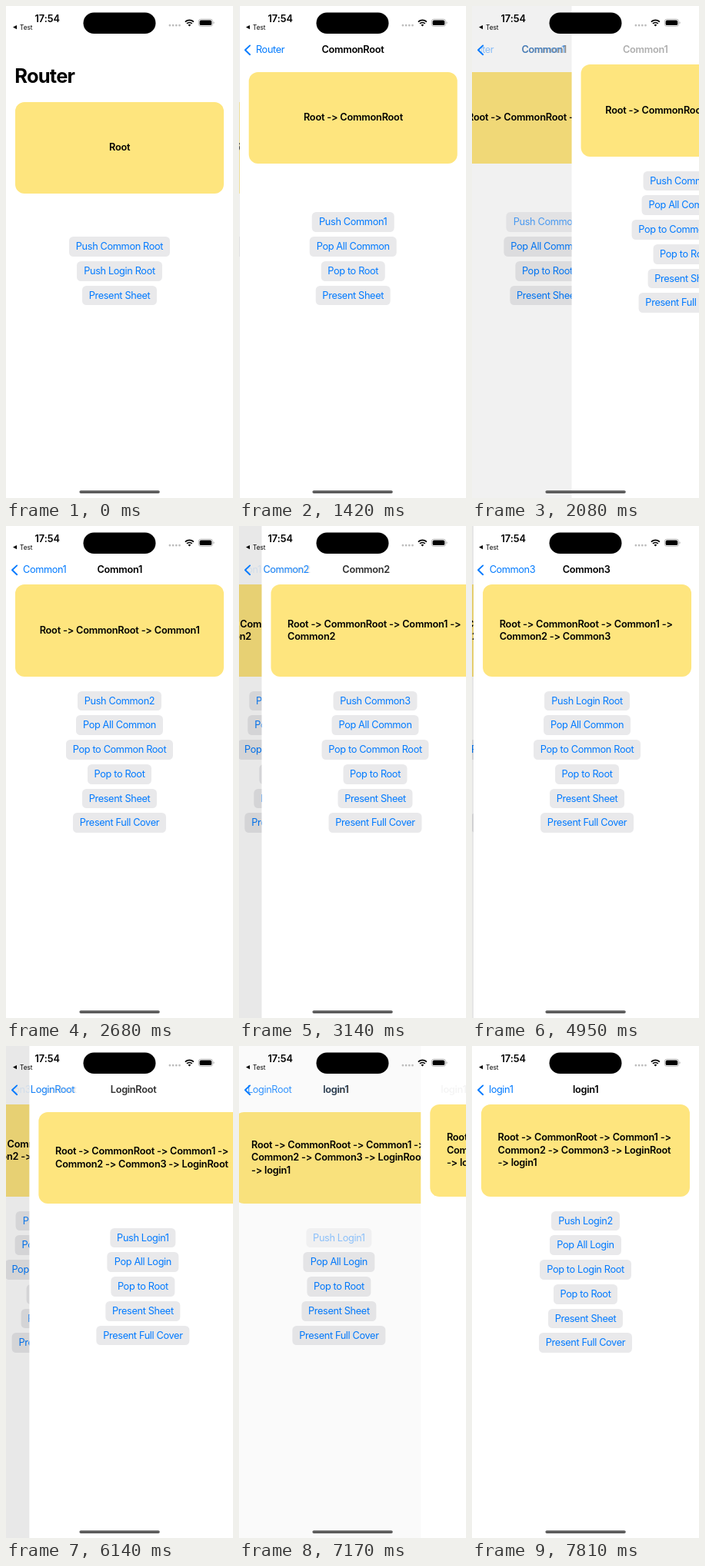
An HTML page that plays this animation: 295x640 px, repeating every 8 s.

```html
<!DOCTYPE html>
<html lang="en">
<head>
<meta charset="utf-8">
<title>Router</title>
<style>
  html, body { margin: 0; width: 100%; height: 100%; overflow: hidden; background: #fff; }
  #stage {
    position: relative; width: 295px; height: 640px; overflow: hidden; background: #fff;
    font: 400 12.75px/16.5px Inter, "Liberation Sans", sans-serif;
    font-variant-ligatures: none; font-feature-settings: "calt" 0; color: #000;
  }
  #stage div { white-space: pre; }
  .page { position: absolute; inset: 0; background: #fff; }
  .card {
    position: absolute; left: 12.2px; width: 271px; height: 119.7px; border-radius: 12px;
    background: #fee57e; display: flex; align-items: center; justify-content: center;
    font-weight: 600; letter-spacing: -.22px;
  }
  .buttons {
    position: absolute; left: 0; width: 100%;
    display: flex; flex-direction: column; align-items: center; gap: 6px;
  }
  .button {
    padding: 0 9px; border-radius: 5.5px; background: #e9e9eb; color: #007aff;
    line-height: 25.75px; letter-spacing: -.36px;
  }
  .shade { position: absolute; inset: 0; background: #000; }
  .bar { position: absolute; left: 0; top: 49.2px; transform-origin: 0 12.9px; }
  .title { font-weight: 600; letter-spacing: -.3px; }
  .back { color: #007aff; letter-spacing: -.4px; }
  .mask { position: absolute; left: 12px; top: 40px; width: 283px; height: 32px; overflow: hidden; }
  .mask .bar { left: -12px; top: 9.2px; }
  .large {
    position: absolute; left: 11.3px; top: 76px; transform-origin: 0 24.3px;
    font-size: 25.5px; line-height: 30px; font-weight: 700; letter-spacing: -.8px;
  }
  svg { position: absolute; left: 0; top: 0; }
</style>
</head>
<body>
<div id="stage"></div>
<script>
const WIDTH = 295, LOOP = 8000, BACK_X = 22, SPRING = 18.26;
const stage = document.getElementById('stage');

const route = ['Root', ' -> CommonRoot', ' -> Common1', ' -> \nCommon2',
  ' -> Common3', ' -> LoginRoot', ' \n-> login1'];

const common = ['Pop All Common', 'Pop to Common Root', 'Pop to Root', 'Present Sheet', 'Present Full Cover'];
const screens = [
  { title: 'Router', back: '', cardY: 124.7, buttons: ['Push Common Root', 'Push Login Root', 'Present Sheet'] },
  { title: 'CommonRoot', back: 'Router', cardY: 85.8,
    buttons: ['Push Common1', 'Pop All Common', 'Pop to Root', 'Present Sheet'] },
  { title: 'Common1', cardY: 76.3, buttons: ['Push Common2', ...common] },
  { title: 'Common2', cardY: 76.3, buttons: ['Push Common3', ...common] },
  { title: 'Common3', cardY: 76.3, buttons: ['Push Login Root', ...common] },
  { title: 'LoginRoot', cardY: 85.8,
    buttons: ['Push Login1', 'Pop All Login', 'Pop to Root', 'Present Sheet', 'Present Full Cover'] },
  { title: 'login1', cardY: 76.3, buttons: ['Push Login2', 'Pop All Login', 'Pop to Login Root',
    'Pop to Root', 'Present Sheet', 'Present Full Cover'] }
];

// first and last step, number of steps, start of the spring, rest (ms)
const pushes = [
  [890, 1420, 6, 970, 1640],
  [1970, 2490, 6, 1971, 2680],
  [2920, 3350, 5, 2922, 3620],
  [4490, 5050, 6, 4552, 5260],
  [5920, 6340, 5, 5919, 6630],
  [7060, 7610, 6, 7125, 7810]
];

function add(parent, className, text = '') {
  const el = document.createElement('div');
  el.className = className;
  el.textContent = text;
  return parent.appendChild(el);
}

const pages = screens.map(({ cardY, buttons }) => {
  const el = add(stage, 'page');
  const card = add(el, 'card');
  card.style.top = cardY + 'px';
  const text = add(card, 'text');
  const column = add(el, 'buttons');
  const lastY = buttons.length === 6 ? 373.3 : 363.5;
  column.style.top = lastY - (buttons.length - 1) * 31.75 + 'px';
  const [first] = buttons.map(label => add(column, 'button', label));
  return { el, text, first, shade: add(el, 'shade') };
});

const large = add(stage, 'large', 'Router');
const oldBack = add(add(stage, 'mask'), 'bar back');
const oldTitle = add(stage, 'bar title');
const newBack = add(stage, 'bar back');
const newTitle = add(stage, 'bar title');

stage.insertAdjacentHTML('beforeend', `
<svg width="295" height="640" fill="none">
  <path id="chevron" d="M14.2 51.4 8 57.3l6.2 5.9" stroke="#007aff" stroke-width="1.9" stroke-linecap="round" stroke-linejoin="round"/>
  <g fill="#000" font-family="Inter, 'Liberation Sans', sans-serif">
    <text x="37.4" y="21" font-size="12.75" font-weight="600">17:54</text>
    <text x="18" y="30.7" font-size="8.25">Test</text>
    <path d="M9 27.6 14 24.9v5.4z"/>
    <rect x="100.5" y="8.5" width="94" height="27.5" rx="13.75"/>
    <rect x="251.6" y="18.5" width="15.7" height="6.6" rx="1.9"/>
    <path d="M238.4 26.6l-1.8-1.9a2.6 2.6 0 0 1 3.6 0z"/>
  </g>
  <path d="M212.9 25.2h13" stroke="#bcbcbc" stroke-width="2.7" stroke-linecap="round" stroke-dasharray="0 4.2"/>
  <path d="M232.9 20.6a8 8 0 0 1 11 0M235 22.9a5 5 0 0 1 6.8 0" stroke="#000" stroke-width="1.8"/>
  <rect x="250.3" y="17.2" width="18.3" height="9.2" rx="3" stroke="#a6a6a6" stroke-width=".8"/>
  <path d="M269.6 20.3a1.6 1.6 0 0 1 0 3z" fill="#a6a6a6"/>
  <rect x="95.4" y="630.2" width="104.4" height="3.7" rx="1.85" fill="#5c5c5c"/>
</svg>`);
const chevron = document.getElementById('chevron');

function show(el, text, opacity) {
  if (el.textContent !== text) el.textContent = text;
  el.style.opacity = opacity;
}

function move(el, x, y = 0, scale = 1) {
  el.style.transform = `translate(${x}px, ${y}px) scale(${scale})`;
}

const centred = el => (WIDTH - el.offsetWidth) / 2;

// Share of the push still to travel: a critically damped spring seen in steps.
function remaining(t, [first, last, steps, start, rest]) {
  if (t >= rest) return 0;
  const step = (last - first) / (steps - 1);
  const seen = first + Math.min(steps - 1, Math.floor((t - first) / step + 1e-6)) * step;
  const x = SPRING * Math.max(0, seen - start) / 1000;
  return (1 + x) * Math.exp(-x);
}

function render(t) {
  const k = pushes.filter(([first]) => t >= first).length;
  const r = k ? remaining(t, pushes[k - 1]) : 0;
  const p = 1 - r;
  const text = route.slice(0, k + 1).join('');

  pages.forEach((page, i) => {
    const leaving = i === k - 1 && r > 0;
    page.el.style.display = i === k || leaving ? '' : 'none';
    if (page.text.textContent !== text) page.text.textContent = text;
    move(page.el, leaving ? -.3 * WIDTH * p : WIDTH * r);
    page.shade.style.opacity = leaving ? .1 * p : 0;
    page.first.style.opacity = leaving ? .3 + .7 * p : 1;
  });

  const { title, back = title } = screens[k];
  const previous = screens[Math.max(0, k - 1)];

  large.style.opacity = k === 0 ? 1 : k === 1 ? r : 0;
  if (k < 2) move(large, k * 10 * p, k * -39 * p, 1 - k * .5 * p);

  chevron.style.opacity = k === 0 ? 0 : k === 1 ? p : 1;
  show(newTitle, title, k ? p * p : 0);
  const titleX = centred(newTitle);
  move(newTitle, titleX + (WIDTH - titleX) * r);

  show(oldTitle, title, k > 1 ? r : 0);
  const fromX = centred(oldTitle);
  move(oldTitle, fromX + (BACK_X - fromX) * p);

  show(newBack, back, k ? p : 0);
  if (k === 1) move(newBack, 12 + 10 * p, 39 * r, 1 + r);
  else move(newBack, BACK_X + (fromX - BACK_X) * r);

  show(oldBack, previous.back ?? previous.title, k > 1 ? r : 0);
  move(oldBack, BACK_X - 55 * p);
}

const origin = performance.now();
function tick() {
  render((performance.now() - origin) % LOOP);
  requestAnimationFrame(tick);
}
tick();
</script>
</body>
</html>
```
